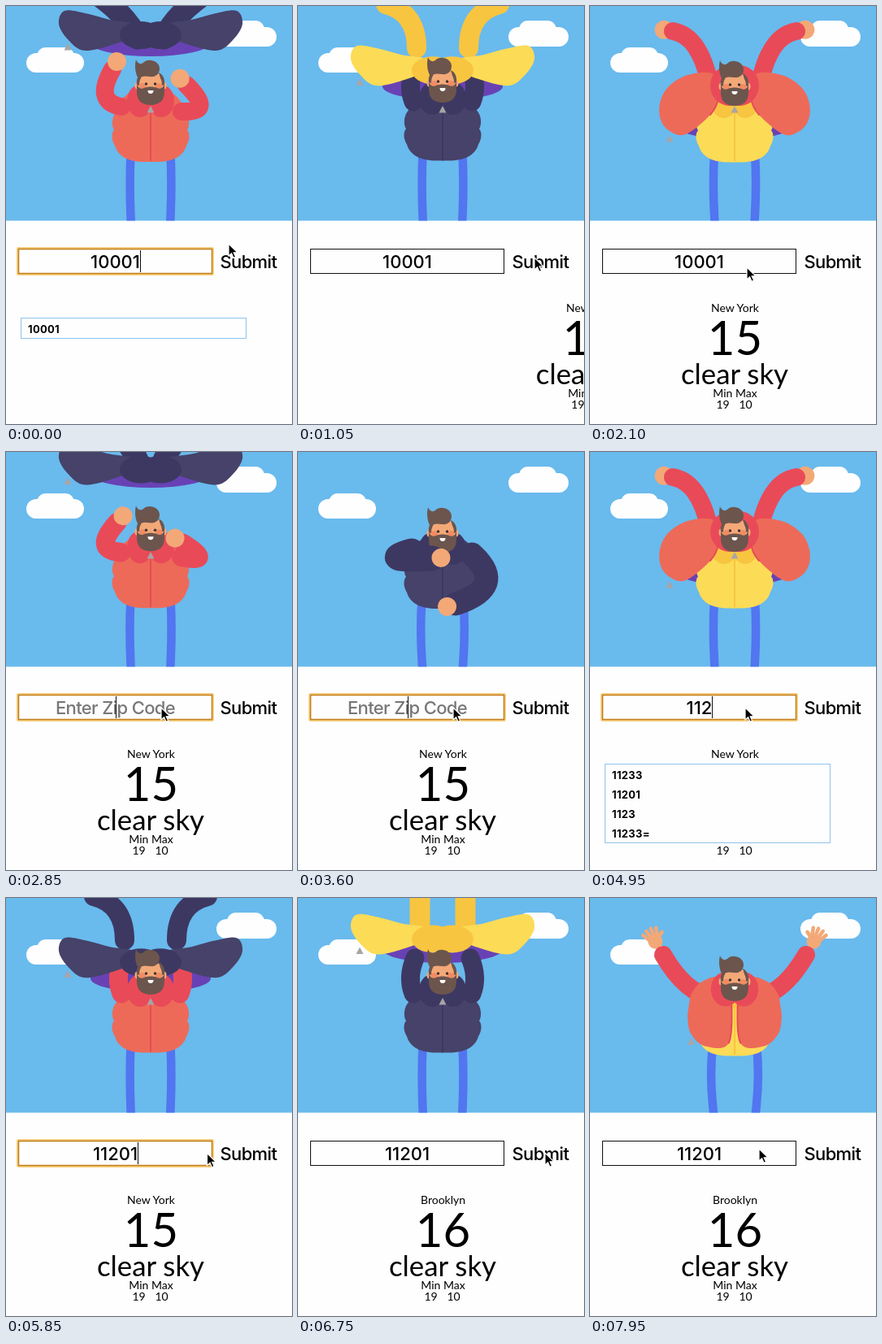
Animation of 352x515 px, one loop 8 s. Source, as an HTML page:

```html
<!DOCTYPE html>
<html lang="en">
<head>
<meta charset="utf-8">
<title>Weather by zip code</title>
<style>
html, body { margin: 0; width: 100%; height: 100%; overflow: hidden; background: #fefefe; }
svg { display: block; width: 352px; height: 515px; }
.ui { font: 500 22px Inter, Roboto, sans-serif; letter-spacing: -0.65px; }
.ui.digits { letter-spacing: 0; }
.list { font: 700 13px Inter, Roboto, sans-serif; letter-spacing: 0.3px; }
.info { font: 14px Lato, "Open Sans", sans-serif; text-anchor: middle; }
</style>
</head>
<body>
<svg viewBox="0 0 352 515">
  <defs><clipPath id="sky"><rect width="352" height="264.5"/></clipPath></defs>
  <rect width="352" height="515" fill="#fefefe"/>
  <g clip-path="url(#sky)">
    <rect width="352" height="265" fill="#69baed"/>
    <g fill="#fefefe">
      <rect x="25" y="58" width="71" height="24" rx="12"/>
      <rect x="38" y="51" width="46" height="22" rx="11"/>
      <rect x="259" y="26" width="74" height="24" rx="12"/>
      <rect x="272" y="18" width="46" height="22" rx="11"/>
    </g>
    <g id="man"></g>
  </g>
  <g id="info" class="info">
    <text id="city" x="178.5" y="377"></text>
    <text id="temp" x="178.5" y="430" font-size="58"></text>
    <text x="178" y="466" font-size="34.8">clear sky</text>
    <text x="178.5" y="482">Min Max</text>
    <text x="163.5" y="496">19</text>
    <text x="191.5" y="496">10</text>
  </g>
  <g id="ring" fill="none">
    <rect x="14" y="298" width="241" height="33" rx="1.5" stroke="#f6cf7f" stroke-width="2"/>
    <rect x="15.5" y="299.5" width="238" height="30" stroke="#c07c1a" stroke-width="1.5"/>
  </g>
  <rect id="box" x="15.5" y="299.5" width="238" height="30" fill="none" stroke="#111"/>
  <text id="field" x="134.5" y="323" text-anchor="middle"></text>
  <path id="caret" stroke="#111"/>
  <text class="ui" x="263.5" y="323">Submit</text>
  <g id="list" class="list"></g>
  <path id="cursor" d="M0 0V15L3.6 11.8L6 17.2L8.6 16L6.2 10.8H11Z" stroke="#fff" stroke-width="1.2"/>
</svg>
<script>
const LOOP = 8000, STEP = 150, COAT = 960, CLOSED_AT = 420;
const $ = id => document.getElementById(id);

// body and dark trim, in the order the coats arrive
const COLORS = [["#464269", "#3d3862"], ["#fcdb57", "#f8c540"], ["#ed6a59", "#e94a58"]];
const SKIN = "#f3a877", HAIR = "#6c554d", LINING = "#6842b5";

const mix = (a, b, k) => a.map((v, i) => v + (b[i] - v) * k);
const part = (t, from, to) => Math.min(1, Math.max(0, (t - from) / (to - from)));
const easeOut = k => 1 - (1 - k) ** 3;

// Value of a [time, values] track at time t
function at(track, t) {
  const i = track.findIndex(row => row[0] > t);
  if (i === 0) return track[0][1];
  if (i < 0) return track[track.length - 1][1];
  const [a, b] = [track[i - 1], track[i]];
  return mix(a[1], b[1], part(t, a[0], b[0]));
}

// Left half of a coat, mirrored at x = 178: outline, collar (y, gap, radii), lining (y, radii)
const OVER = {
  wing: [158,38, 128,33, 98,25, 72,22, 65,38, 76,57, 98,71, 142,60, 160,50],
  collar: [52, 12, 26, 17], lining: [65, 74, 17]
};
const SPREAD = {
  wing: [152,84, 120,85, 96,100, 86,120, 87,140, 98,154, 118,158, 148,134, 158,112],
  collar: [98, 6, 24, 25], lining: [150, 68, 14]
};
const CLOSED = {
  wing: [165,102, 145,108, 135,122, 133,138, 131,152, 133,172, 148,190, 178,193, 178,120],
  collar: [117, 13, 16, 20], lining: [165, 30, 10]
};

// Arm poses: shoulder, bend, wrist, sleeve width, reach and spread of the hand
const LEFT = {
  drop: [162,40, 150,14, 118,-10, 27, 11, 0],
  up: [150,45, 150,15, 150,-12, 25, 11, 0],
  flop: [146,52, 146,8, 108,-2, 24, 11, 0],
  high: [146,90, 133,36, 102,31, 22, 11, 0],
  wide: [150,122, 118,118, 90,70, 22, 19, 1],
  hem: [140,122, 98,165, 162,180, 30, 11, 0],
  chin: [140,122, 95,135, 165,131, 31, 11, 0],
  reach: [142,124, 108,118, 131,78, 22, 11, 0],
  lift: [142,118, 134,98, 144,74, 23, 11, 0]
};
const RIGHT = {
  ...LEFT,
  chin: [142,126, 98,166, 162,187, 29, 11, 0],
  reach: [140,130, 98,132, 134,97, 22, 11, 0]
};
const MOVES = { 0: "drop", 30: "up", 90: "flop", 150: "high", 180: "high", 270: "wide",
  540: "hem", 720: "chin", 780: "chin", 960: "reach", 990: "lift" };
const track = poses => Object.entries(MOVES).map(([t, name]) => [+t, poses[name]]);
const ARMS = [track(LEFT), track(RIGHT)];

const BOB = [[0, [0]], [30, [-3]], [90, [-3]], [150, [1]], [180, [1]], [270, [5]], [420, [3]], [720, [2]], [960, [0]]];
const POINTER = [[0, [274,293]], [300, [291,310]], [1200, [291,310]], [2100, [193,322]], [2400, [191,315]],
  [5400, [191,315]], [6300, [304,314]], [6900, [304,314]], [7650, [208,309]]];

const path = (d, fill, more = "") => `<path d="${d}" fill="${fill}" ${more}/>`;
const line = (d, color, width) =>
  path(d, "none", `stroke="${color}" stroke-width="${width}" stroke-linecap="round"`);
const oval = (x, y, rx, ry, fill) => `<ellipse cx="${x}" cy="${y}" rx="${rx}" ry="${ry}" fill="${fill}"/>`;
const shift = (y, s) => `<g transform="translate(0 ${y})">${s}</g>`;
const flip = s => `<g transform="translate(356 0) scale(-1 1)">${s}</g>`;
const both = s => s + flip(s);

// Smooth curve through flat coordinates, from point "from" to point "to"
function curve(v, from, to) {
  const n = v.length / 2;
  const p = i => { i = (i + n) % n; return [v[2 * i], v[2 * i + 1]]; };
  let d = "M" + p(from);
  for (let i = from; i < to; i++) {
    const [a, b, c, e] = [p(i - 1), p(i), p(i + 1), p(i + 2)];
    d += `C${[0, 1].map(j => b[j] + (c[j] - a[j]) / 6)} ${[0, 1].map(j => c[j] - (e[j] - b[j]) / 6)} ${c}`;
  }
  return d;
}

function hand(x, y, angle, spread) {
  const palm = 11.5 - 2.5 * spread;
  let s = oval(0, 0, palm, palm, SKIN);
  for (let i = 0; i < 4; i++) {
    const f = (i - 1.5) * 0.38, r = 8 + 9 * spread;
    s += line(`M2 ${(i - 1.5) * 3}L${r * Math.cos(f)} ${r * Math.sin(f)}`, SKIN, 4.5);
  }
  s += line(`M0 0L${6 * spread} ${13 * spread}`, SKIN, 4.5);
  return `<g transform="translate(${x} ${y}) rotate(${angle})">${s}</g>`;
}

function arm(moves, age, dark) {
  const [sx, sy, bx, by, wx, wy, width, reach, spread] = at(moves, age);
  const sleeve = line(`M${sx} ${sy}Q${bx} ${by} ${wx} ${wy}`, dark, width);
  if (age < 120 || age > COAT + 10) return sleeve;
  const dir = Math.atan2(wy - by, wx - bx);
  const palm = hand(wx + reach * Math.cos(dir), wy + reach * Math.sin(dir), dir * 180 / Math.PI, spread);
  return age > CLOSED_AT ? sleeve + palm : palm + sleeve;
}
const arms = (age, dark) => arm(ARMS[0], age, dark) + flip(arm(ARMS[1], age, dark));

const collar = ([y, gap, rx, ry], dark) => both(oval(178 - gap, y, rx, ry, dark));
const pull = (x, y) => path(`M${x} ${y - 4}l-4.5 8.5h9z`, "#a9a4a6");

function worn(age, [body, dark], bob) {
  const half = "M179 192H170C152 192 138 186 134 172C129 164 130 156 133 153C129 146 131 135 136 130C138 120 144 112 152 107L179 100Z";
  const zip = 188 - 61 * part(age, 540, 720);
  return shift(bob / 2, both(path(half, body)) + line("M178 128V190", dark, 2)) +
    shift(bob, collar(CLOSED.collar, dark)) + (age < COAT + 200 ? pull(178, zip) : "");
}

// A coat drops in overhead, spreads around the arms, then wraps the body
function shape(key, age) {
  const spread = mix(OVER[key], SPREAD[key], part(age, 90, 150));
  return mix(spread, CLOSED[key], easeOut(part(age, 180, CLOSED_AT)));
}
const drop = age => (0.48 * Math.min(age, 90) - 16) * (1 - part(age, 90, 150));

function loose(age, [body, dark]) {
  const v = shape("wing", age);
  let s = path(curve(v, 0, 9) + "Z", body);
  if (age > 120) s += line(curve(v, 7, 8), dark, 2);
  return shift(Math.min(0, age), arms(age, dark)) +
    shift(drop(age), pull(v[10], v[11] + 9) + both(s) + collar(shape("collar", age), dark));
}

function lining(age) {
  const [y, rx, ry] = shape("lining", age);
  return oval(178, y + 1.25 * drop(age), rx, ry, LINING);
}

function head() {
  return both(oval(161.5, 98, 3, 4.5, SKIN)) +
    path("M162 106V92Q163 82 178 82Q193 82 194 92V106Z", SKIN) +
    both(oval(168, 99, 4, 4, "#f18b63")) +
    both(path("M161 97C160 90 163 84 168 82L166 89Q164 92 164 98Z", HAIR)) +
    path("M163 90C159 83 158 74 160 66C162 71 166 73 170 69C176 64 189 68 189 77C189 84 184 88 177 87C171 86 167 86 163 90Z", HAIR) +
    path("M161 95V106C161 117 168 122 178 122C188 122 195 117 195 106V95C194 101 190 103 186 101C182 99 174 99 170 101C166 103 162 101 161 95Z", HAIR) +
    both(oval(172.5, 96, 1.7, 1.8, "#3c2f35")) +
    path("M174.5 104h7a3.5 4 0 0 1-7 0z", "#fff");
}

function legs(bob) {
  const b = Math.max(0, bob);
  return both(line(`M${153.5 - b / 2} 182Q${151.5 - b} 222 ${154 - b / 4} 270`, "#5275f0", 10.5));
}

function man(t) {
  const n = Math.floor(t / COAT), age = t % COAT, [bob] = at(BOB, age);
  const [before, now, next] = [2, 0, 1].map(i => COLORS[(n + i) % 3]);
  const face = shift(bob, head());
  if (age < CLOSED_AT) {
    return lining(age) + legs(bob) + worn(age + COAT, before, bob) +
      (age < 130 ? arms(age + COAT, before[1]) : "") + loose(age, now) + face;
  }
  let s = legs(bob) + worn(age, now, bob) + face + arms(age, now[1]);
  if (age > 840) s += lining(age - COAT) + loose(age - COAT, next);
  return s;
}

// time, field text, suggestions
const ZIPS = ["11233", "11201", "1123", "11233="];
const EDITS = [
  [0, "10001", ["10001"]], [450, "10001", []], [2850, "", []],
  [4050, "1", ["10001", ...ZIPS, "10002"]], [4350, "11", ZIPS], [4650, "112", ZIPS],
  [5100, "1120", ["11201"]], [5250, "11201", []]
];

function form(t) {
  const [, text, rows] = EDITS.filter(e => e[0] <= t).pop();
  const focus = t < 450 || (t >= 2550 && t < 6450);
  const field = $("field");
  field.textContent = text || "Enter Zip Code";
  field.setAttribute("class", text ? "ui digits" : "ui");
  field.setAttribute("fill", text ? "#000" : "#777");
  $("ring").style.display = focus ? "" : "none";
  $("box").style.display = focus ? "none" : "";
  const x = 135.5 + (text ? field.getComputedTextLength() / 2 - 0.5 : 0);
  $("caret").setAttribute("d", focus ? `M${Math.floor(x) + 0.5} 301V328` : "");
  $("list").innerHTML = rows.length
    ? `<rect x="18.5" y="384.5" width="277" height="${rows.length * 24 + 1}" fill="#fefefe" stroke="#8fc3ea"/>` +
      rows.map((r, i) => `<text x="27" y="${403 + i * 24}">${r}</text>`).join("")
    : "";
}

function weather(t) {
  const left = 1 - part(t, 900, 1350);
  $("info").style.display = t < 900 ? "none" : "";
  $("info").setAttribute("transform", `translate(${407 * left * left} 0)`);
  $("city").textContent = t < 6600 ? "New York" : "Brooklyn";
  $("temp").textContent = t < 6600 ? "15" : "16";
}

function draw(t) {
  $("man").innerHTML = man(t);
  form(t);
  weather(t);
  $("cursor").setAttribute("transform", `translate(${at(POINTER, t)})`);
}

let shown = -1;
function tick() {
  const t = Math.floor(performance.now() % LOOP / STEP) * STEP;
  if (t !== shown) draw(shown = t);
  requestAnimationFrame(tick);
}
tick();
</script>
</body>
</html>
```
